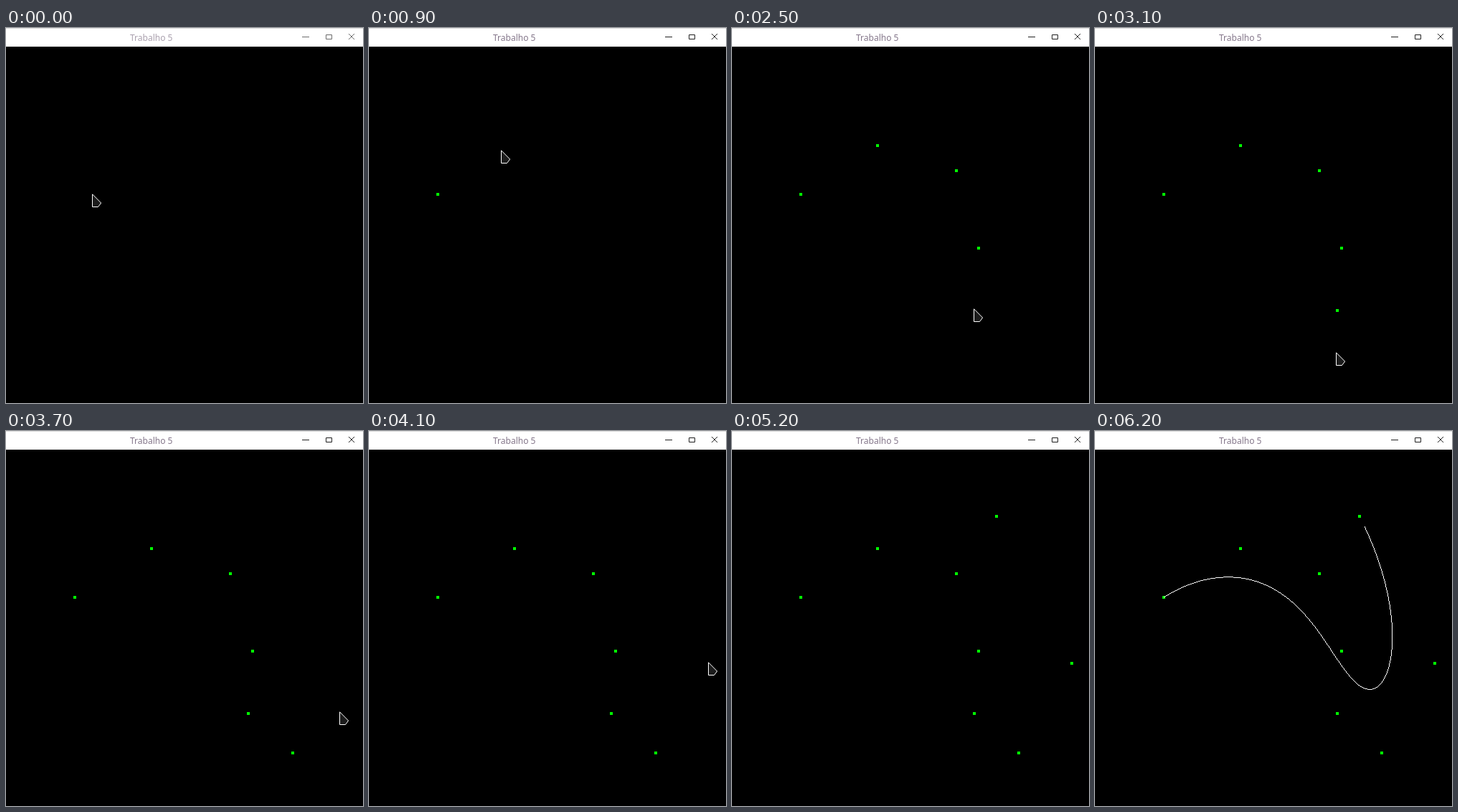
Animation, 498 px wide and 523 px high, one loop 8 s. Source, as an HTML page:

```html
<!DOCTYPE html>
<html lang="pt">
<head>
<meta charset="utf-8">
<title>Trabalho 5</title>
<style>
  html, body { margin: 0; width: 100%; height: 100%; overflow: hidden; background: #000; }
  svg { display: block; }
  #bar { position: absolute; inset: 0 0 auto; height: 26px; box-sizing: border-box;
         background: #fff; border-top: 1px solid #dcdcdc; color: #aaa0ae; stroke: #6c6c6c; }
  #bar.active { color: #84768a; stroke: #222; }
  #title { position: absolute; left: 173px; top: 4px; white-space: nowrap;
           font: 12px/17px "Noto Sans", "Open Sans", sans-serif; }
  #bar svg { position: absolute; left: 0; top: -1px; fill: none; }
  #dots { fill: #0f0; shape-rendering: crispEdges; }
  #curve { fill: #fff; shape-rendering: crispEdges; }
</style>
</head>
<body>
<svg width="498" height="523">
  <g id="dots"></g>
  <path id="curve"/>
  <g id="cursor">
    <path d="M.5 .8V18.5H8.5L12.6 13Z" stroke="#000" stroke-width="3"/>
    <path d="M.5 .8V18.5H8.5L12.6 13Z" fill="#1c1c1c" stroke="#fff"/>
  </g>
</svg>
<div id="bar">
  <div id="title">Trabalho 5</div>
  <svg width="498" height="26">
    <path d="M413 12.5H423M446.5 9.5h8v6h-8zM478 8l8 8m0-8l-8 8"/>
  </svg>
</div>
<script>
const LOOP = 8000, TICK = 100, FOCUS = 600, CURVE = 6200, HIDE = 5200;

// Pointer stops: arrival time and sideways bend of the way there.
// A stop with a click time drops a control point.
const stops = [
  { x: 121, y: 233, at: 0 },
  { x: 96, y: 232, at: 300, click: 600, bend: 0 },
  { x: 203, y: 164, at: 1033, click: 1100, bend: .05 },
  { x: 313, y: 199, at: 1450, click: 1600, bend: 0 },
  { x: 344, y: 307, at: 2048, click: 2200, bend: .02 },
  { x: 338, y: 394, at: 2532, click: 2700, bend: 0 },
  { x: 268, y: 459, at: 2900, bend: 0 },
  { x: 400, y: 449, at: 3290, click: 3600, bend: 0 },
  { x: 474, y: 324, at: 3870, click: 4290, bend: -.2 },
  { x: 369, y: 119, at: 4680, click: 5100, bend: .03 },
  { x: 479, y: 285, at: 5200, bend: 0 }
];
const points = stops.filter(s => s.click);

const $ = id => document.getElementById(id);
const bar = $('bar'), curve = $('curve'), cursor = $('cursor');
const mix = (a, b, u) => a + (b - a) * u;
const ease = u => u * u * (3 - 2 * u);
const leave = s => s.click ? s.click - TICK : s.at;
const show = (el, on) => el.setAttribute('visibility', on ? 'visible' : 'hidden');

const dots = points.map(({ x, y }) => {
  const dot = document.createElementNS('http://www.w3.org/2000/svg', 'path');
  dot.setAttribute('d', `M${x - 2} ${y - 2}h4v4h-4z`);
  return $('dots').appendChild(dot);
});

// De Casteljau evaluation
function bezier(u) {
  let p = points.map(({ x, y }) => [x, y]);
  while (p.length > 1) {
    p = p.slice(1).map(([x, y], i) => [mix(p[i][0], x, u), mix(p[i][1], y, u)]);
  }
  return p[0];
}

// One pixel per column or row, whichever the segment crosses more of
function pixelLine(a, b) {
  const major = Math.abs(b[0] - a[0]) >= Math.abs(b[1] - a[1]) ? 0 : 1;
  const minor = 1 - major;
  const [from, to] = a[major] < b[major] ? [a, b] : [b, a];
  let d = '';
  for (let m = Math.ceil(from[major] - .5); m + .5 < to[major]; m++) {
    const u = (m + .5 - from[major]) / (to[major] - from[major]);
    const px = [];
    px[major] = m;
    px[minor] = Math.floor(mix(from[minor], to[minor], u));
    d += `M${px}h1v1h-1z`;
  }
  return d;
}

// The curve stops one step short of its last point
const samples = Array.from({ length: 100 }, (_, i) => bezier(i / 100));
curve.setAttribute('d', samples.slice(1).map((p, i) => pixelLine(samples[i], p)).join(''));

function pointerAt(t) {
  const i = stops.findLastIndex(s => leave(s) <= t);
  const a = stops[i], b = stops[i + 1] || a;
  const u = b === a ? 1 : ease(Math.min(1, (t - leave(a)) / (b.at - leave(a))));
  const side = 4 * u * (1 - u) * (b.bend || 0);
  return [
    Math.round(mix(a.x, b.x, u) + side * (b.y - a.y)) - 1,
    Math.round(mix(a.y, b.y, u) - side * (b.x - a.x)) - 2
  ];
}

function draw(time) {
  const t = Math.floor(time / TICK) * TICK;
  bar.classList.toggle('active', t >= FOCUS);
  dots.forEach((dot, i) => show(dot, t >= points[i].click));
  show(curve, t >= CURVE);
  show(cursor, t < HIDE);
  cursor.setAttribute('transform', `translate(${pointerAt(t)})`);
}

const origin = performance.now();
function frame() {
  draw((performance.now() - origin) % LOOP);
  requestAnimationFrame(frame);
}
frame();
</script>
</body>
</html>
```
